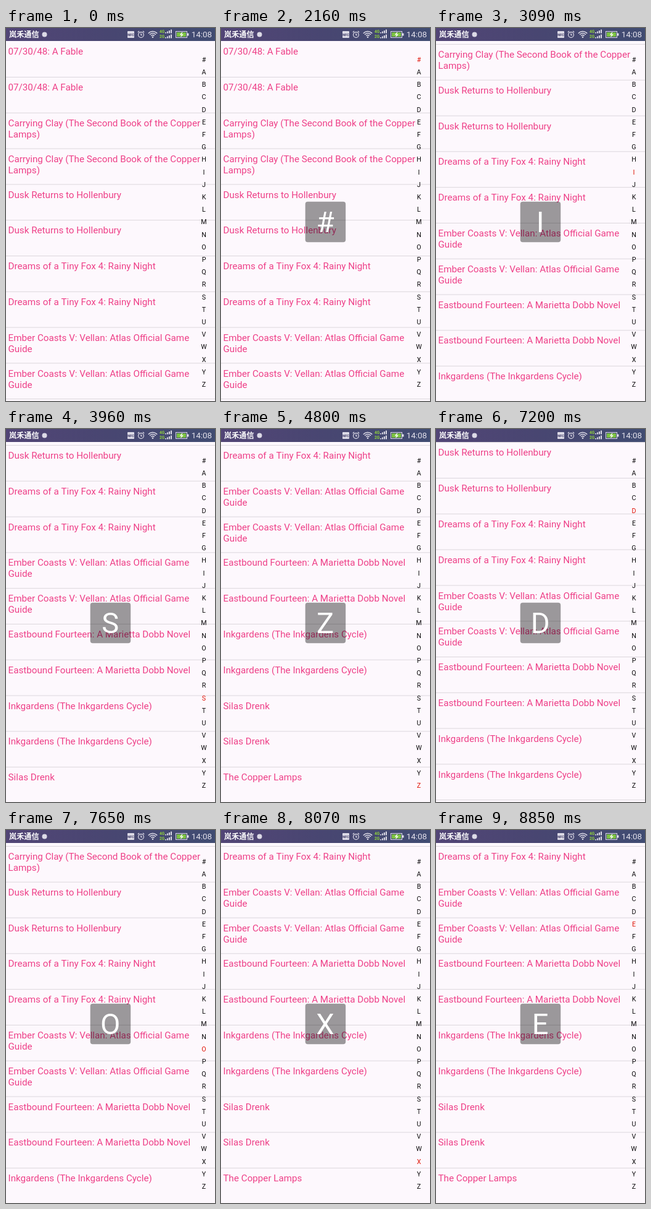
An HTML page with a canvas for the animation above (8.97 s loop, 339x603 px).

```html
<!DOCTYPE html>
<html lang="en">
<head>
<meta charset="utf-8">
<title>Alphabet index list</title>
<style>
html, body { margin: 0; width: 100%; height: 100%; overflow: hidden; background: #fdf8fd; }
canvas { display: block; width: 100vw; height: 100vh; }
</style>
</head>
<body>
<canvas id="stage"></canvas>
<script>
const W = 339, H = 603, LOOP = 8970;
const BAR = 21, LIST = 22, ROW = 57.8, VIEW = ROW * 10 + 4.7;
const LETTERS = '#ABCDEFGHIJKLMNOPQRSTUVWXYZ';
const SANS = 'Roboto, sans-serif';

const books = [
  ['07/30/48: A Fable'],
  ['Carrying Clay (The Second Book of the Copper', 'Lamps)'],
  ['Dusk Returns to Hollenbury'],
  ['Dreams of a Tiny Fox 4: Rainy Night'],
  ['Ember Coasts V: Vellan: Atlas Official Game', 'Guide'],
  ['Eastbound Fourteen: A Marietta Dobb Novel'],
  ['Inkgardens (The Inkgardens Cycle)'],
  ['Silas Drenk'],
  ['The Copper Lamps']
];
const rows = books.flatMap(b => [b, b]);

// Finger strokes over the index: first time, last time, letters touched
const strokes = [
  [2160, 2160, '#'], [2430, 2520, 'AB'], [2670, 2670, 'C'],
  [2820, 3090, 'DEFGI'], [3120, 3210, 'JL'], [3360, 3630, 'MNOPQ'],
  [3840, 3960, 'RS'], [4110, 4350, 'TUVW'], [4500, 4620, 'XY'],
  [4800, 4800, 'Z'], [6510, 6510, 'X'], [6570, 6990, 'VUSRPOMLJIGE'],
  [7200, 7650, 'DCFILO'], [7710, 8070, 'QSTVX'], [8400, 8850, 'WUSQOMKIHFE']
];

function firstRow(letter) {
  return letter === '#' ? 0 : rows.findIndex(r => r[0][0] === letter);
}

// Scroll only as far as needed to bring the row into view
function reveal(scroll, i) {
  if (i < 0) return scroll;
  if (i * ROW < scroll) return i * ROW;
  return Math.max(scroll, (i + 1) * ROW - VIEW);
}

const states = [{ at: 0, letter: '', scroll: 0 }];
for (const [from, to, letters] of strokes) {
  [...letters].forEach((letter, k) => {
    const at = from + Math.round((to - from) * k / Math.max(1, letters.length - 1) / 30) * 30;
    const scroll = reveal(states[states.length - 1].scroll, firstRow(letter));
    states.push({ at, letter, scroll });
  });
}

const canvas = document.getElementById('stage');
const ctx = canvas.getContext('2d');
const dpr = window.devicePixelRatio || 1;
canvas.width = W * dpr;
canvas.height = H * dpr;
ctx.scale(dpr, dpr);

function text(str, x, y, size, color, align = 'left', weight = 400, family = SANS) {
  ctx.font = `${weight} ${size}px ${family}`;
  ctx.textAlign = align;
  ctx.fillStyle = color;
  ctx.fillText(str, x, y);
}

function box(x, y, w, h, color) {
  ctx.fillStyle = color;
  ctx.fillRect(x, y, w, h);
}

function roundBox(x, y, w, h, r, color) {
  ctx.beginPath();
  ctx.roundRect(x, y, w, h, r);
  ctx.fillStyle = color;
  ctx.fill();
}

function arc(x, y, r, a, b) {
  ctx.beginPath();
  ctx.arc(x, y, r, a, b);
  ctx.stroke();
}

function line(...pts) {
  ctx.beginPath();
  for (let i = 0; i < pts.length; i += 2) ctx.lineTo(pts[i], pts[i + 1]);
  ctx.stroke();
}

function drawList(scroll) {
  rows.forEach((lines, i) => {
    const top = LIST + i * ROW - scroll;
    if (top > H || top + ROW < LIST - 1) return;
    lines.forEach((s, k) => text(s, 3.5, top + 21.3 + k * 18, 15.2, '#ee4088'));
    box(0, top + ROW - 0.8, W, 1, '#dcd7dd');
  });
}

function drawIndex(active) {
  [...LETTERS].forEach((c, i) => {
    text(c, 321, 54.7 + i * 20.2, 10.7, c === active ? '#e01408' : '#0c0a0c', 'center');
  });
}

function drawPopup(letter) {
  roundBox(136.7, 280.7, 65.5, 65.5, 4, 'rgba(0, 0, 0, 0.39)');
  text(letter, 169.1, 329.9, 47, '#fff', 'center');
}

function drawStatus() {
  const g = ctx.createLinearGradient(0, 0, W, 0);
  g.addColorStop(0, '#524576');
  g.addColorStop(0.5, '#484671');
  g.addColorStop(1, '#404c72');
  box(0, 0, W, BAR, g);

  const light = '#dcdae6', green = '#8fd03c';
  text('岚禾通信', 5, 14.5, 12.2, '#fff', 'left', 700, '"Noto Sans CJK SC", "Noto Sans CJK", sans-serif');
  ctx.beginPath();
  ctx.arc(62.5, 10.5, 4, 0, Math.PI * 2);
  ctx.fillStyle = light;
  ctx.fill();

  roundBox(197, 5, 11, 11, 1, light);
  text('NFC', 202.5, 12.7, 5.5, '#3f3c66', 'center', 700);

  ctx.strokeStyle = light;
  ctx.lineWidth = 1.2;
  arc(219, 11, 4.4, 0, Math.PI * 2);
  line(219, 8.5, 219, 11.3, 221, 11.3);
  line(213.8, 7, 216, 5);
  line(222, 5, 224.2, 7);

  ctx.lineWidth = 1.5;
  for (const r of [3.5, 6.5, 9.5]) arc(238, 15, r, -Math.PI * 0.77, -Math.PI * 0.23);
  roundBox(236.7, 13.5, 2.6, 2.6, 1.3, light);

  // Two SIM cards, one row of bars each
  for (const [label, y] of [['4G', 8.5], ['2G', 16.5]]) {
    text(label, 249, y - 0.3, 6.5, green, 'left', 700);
    for (let i = 0; i < 4; i++) {
      const h = 1.5 + i * 1.5;
      box(258 + i * 3, y - h, 2, h, light);
    }
  }

  ctx.strokeStyle = light;
  ctx.lineWidth = 1;
  ctx.strokeRect(275.5, 5.5, 18, 10);
  box(294, 8.5, 2.5, 4, light);
  box(277, 7, 15, 7, '#7cc242');
  ctx.strokeStyle = '#fff';
  ctx.lineWidth = 1.2;
  line(286, 7, 283, 10.7, 286.5, 10.7, 283.5, 14);

  text('14:08', 334, 15.3, 13.4, '#e4e2ec', 'right');
}

function draw(now) {
  const t = now % LOOP;
  const state = states.findLast(s => s.at <= t);
  box(0, 0, W, H, '#fdf8fd');
  drawList(state.scroll);
  drawIndex(state.letter);
  if (state.letter) drawPopup(state.letter);
  drawStatus();
}

const start = performance.now();
function tick() {
  draw(performance.now() - start);
  requestAnimationFrame(tick);
}
tick();
</script>
</body>
</html>
```
